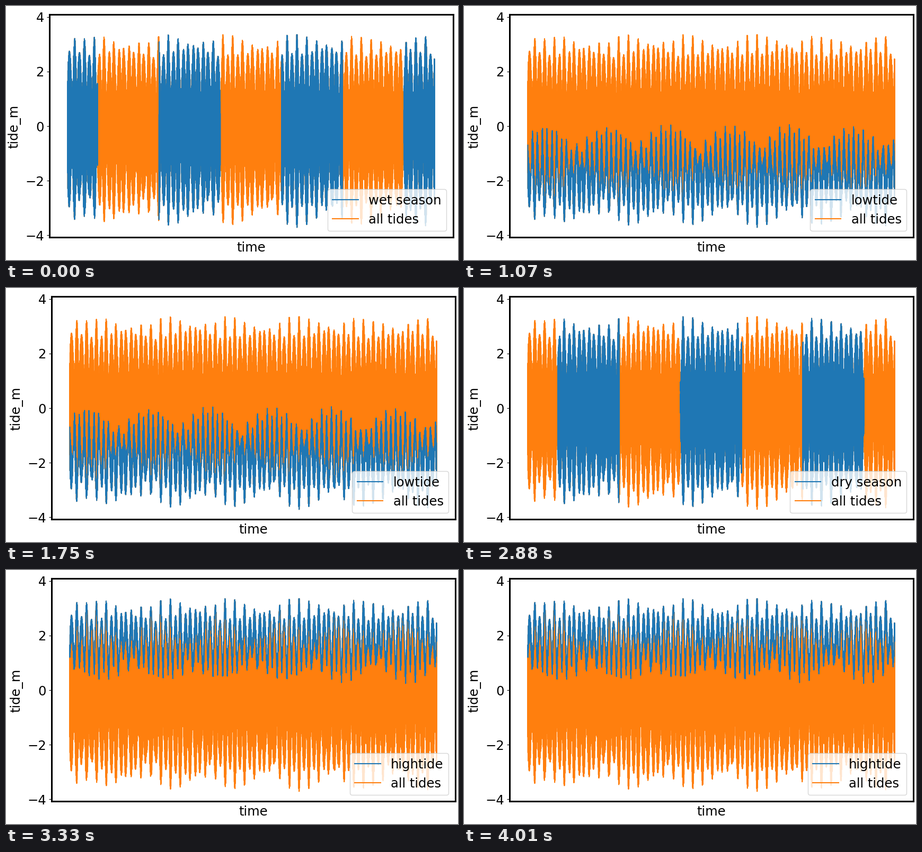
A matplotlib script for the animation above (4.46 s loop, 853 by 480 pixels).

```python
import numpy as np
import matplotlib.pyplot as plt
from matplotlib.animation import FuncAnimation

WIDTH, HEIGHT, DPI = 853, 480, 100
STEP_MS, LOOP_MS = 10, 4460
CHANGES_MS = (1070, 2200, 3330)
BLUE, ORANGE = "tab:blue", "tab:orange"
PEAK = 3.71

plt.rcParams.update({
    "font.family": "DejaVu Sans",
    "font.size": 24.25 * 72 / DPI,
    "axes.linewidth": 2.2,
    "lines.linewidth": 1.5,
    "agg.path.chunksize": 10000,
})

# Harmonic constituents: amplitude (m), Greenwich phase lag, and the
# multiples of (hour angle, moon s, sun h, perigee p) plus a constant.
CONSTITUENTS = {
    "M2": (1.82, 229, (2, -2, 2, 0), 0),
    "S2": (0.92, 269, (2, 0, 0, 0), 0),
    "N2": (0.32, 209, (2, -3, 2, 1), 0),
    "K2": (0.20, 266, (2, 0, 2, 0), 0),
    "nu2": (0.06, 212, (2, -3, 4, -1), 0),
    "L2": (0.04, 235, (2, -1, 2, -1), 180),
    "T2": (0.05, 269, (2, 0, -1, 0), 283),
    "2N2": (0.04, 190, (2, -4, 2, 2), 0),
    "K1": (0.50, 180, (1, 0, 1, 0), 90),
    "O1": (0.32, 180, (1, -2, 1, 0), 270),
    "P1": (0.16, 180, (1, 0, -1, 0), 270),
    "Q1": (0.06, 165, (1, -3, 1, 1), 270),
}


def predict_tide(days):
    """Tide height for days since 2015-01-01 00:00 UTC."""
    epoch = days + 5478.5  # days since J2000
    angles = (
        360 * days,
        218.3164 + 13.17639648 * epoch,
        280.4662 + 0.98564736 * epoch,
        83.3532 + 0.11140353 * epoch,
    )
    height = np.zeros_like(days)
    for amplitude, lag, factors, constant in CONSTITUENTS.values():
        phase = sum(k * a for k, a in zip(factors, angles)) + constant - lag
        height += amplitude * np.cos(np.radians(phase))
    return height * PEAK / np.abs(height).max()


times = np.arange("2015-01-01", "2018-01-01", 30, dtype="datetime64[m]")
days = np.arange(len(times)) / 48
tide = predict_tide(days)

month = times.astype("datetime64[M]").astype(int) % 12 + 1
dry = (month >= 4) & (month <= 9)
before, here, after = tide[:-2], tide[1:-1], tide[2:]
high = np.flatnonzero((here >= before) & (here > after)) + 1
low = np.flatnonzero((here <= before) & (here < after)) + 1

# label, x values, y values, left edge of the axes in pixels
VIEWS = (
    ("wet season", days, np.where(dry, np.nan, tide), 81.5),
    ("lowtide", days[low], tide[low], 85.5),
    ("dry season", days, np.where(dry, tide, np.nan), 85.5),
    ("hightide", days[high], tide[high], 85.5),
)

# The tiny excess keeps the pixel size from being rounded down.
fig = plt.figure(figsize=((WIDTH + 1e-6) / DPI, (HEIGHT + 1e-6) / DPI),
                 dpi=DPI, facecolor="white")


def render(label, x, y, left):
    """Draw one chart and return it as an RGBA image."""
    fig.clear()
    bottom, top, width = 437.5, 16.5, 762
    ax = fig.add_axes((left / WIDTH, 1 - bottom / HEIGHT,
                       width / WIDTH, (bottom - top) / HEIGHT))
    ax.plot(x, y, color=BLUE, label=label, zorder=2.2)
    ax.plot(days, tide, color=ORANGE, label="all tides", zorder=2)
    margin = 0.05 * days[-1]
    ax.set_xlim(-margin, days[-1] + margin)
    ax.set_ylim(-1.1 * PEAK, 1.1 * PEAK)
    ax.set_xticks([])
    ax.set_yticks(range(-4, 5, 2))
    ax.legend(loc="lower right")
    fig.text((left + width / 2) / WIDTH, 1 - 464 / HEIGHT, "time",
             ha="center", va="baseline")
    fig.text((left - 53.5) / WIDTH, 1 - 228 / HEIGHT, "tide_m",
             rotation=90, ha="right", va="center")
    fig.canvas.draw()
    return np.array(fig.canvas.buffer_rgba())


# Each chart is dense, so it is rendered once and then shown as an image.
images = [render(*view) for view in VIEWS]
fig.clear()
screen = fig.figimage(images[0], origin="upper")


def update(frame):
    view = sum(frame * STEP_MS >= change for change in CHANGES_MS)
    screen.set_data(images[view])
    return (screen,)


animation = FuncAnimation(fig, update, frames=LOOP_MS // STEP_MS,
                          interval=STEP_MS, repeat=True, repeat_delay=0)
plt.show()
```
